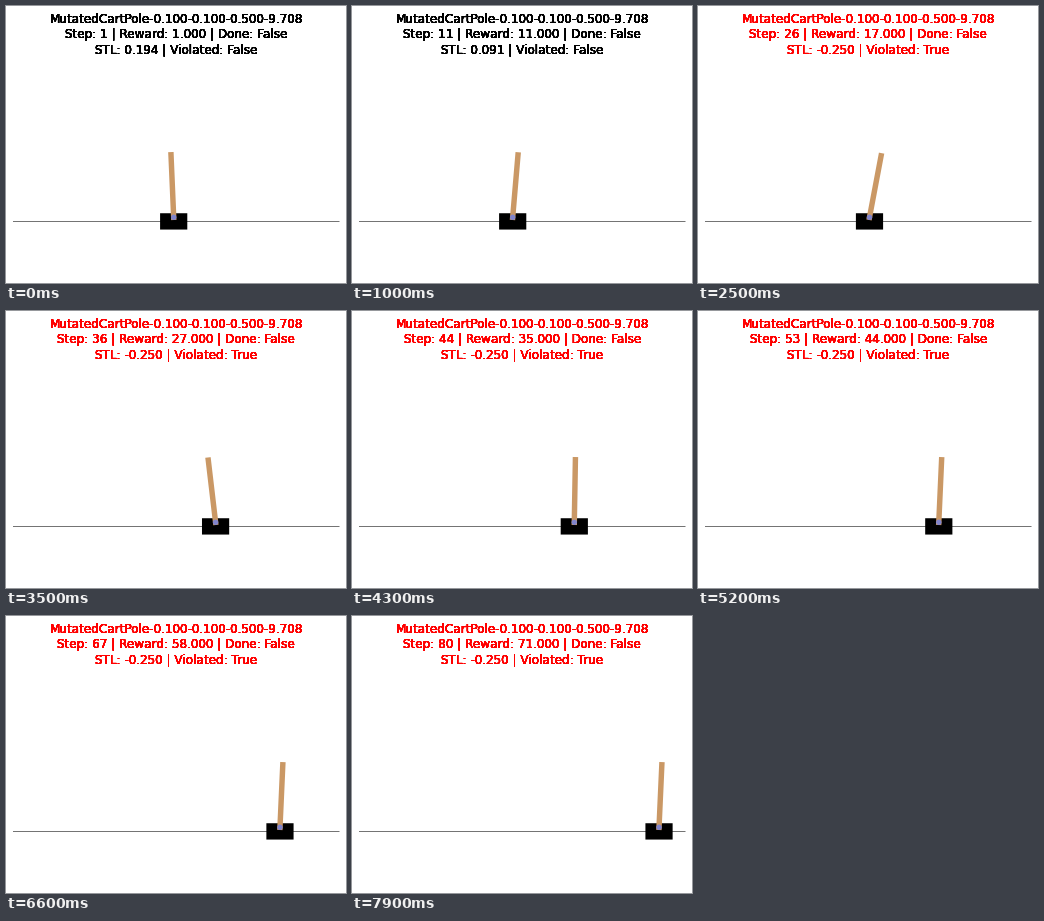
Recreate the animation shown at these times as a matplotlib script. Size 340 by 277 pixels, loop 8 s.

```python
import numpy as np
import matplotlib.pyplot as plt
from matplotlib.animation import FuncAnimation
from matplotlib.patches import Circle, Polygon, Rectangle

W, H, DPI = 340, 277, 72
STEPS = 80
UNIT = 68.0                  # pixels per world unit
PX = UNIT / 125              # pixels per simulator pixel
MID, TRACK, AXLE = 171.5, 215.4, 211.3
CART_W, CART_H = 50 * PX, 30 * PX
POLE_W, POLE_LEN = 10 * PX, UNIT
COUPLING = 1.7               # how far the pole tips back per unit of cart travel
LIMIT = 0.25                 # the cart must stay right of x = -LIMIT


def bump(t, height, mid, width):
    return height * np.exp(-((t - mid) / width) ** 2)


def tilt(t):
    """Starts leaning left, swings far right, dips left, then settles."""
    return (0.045 - bump(t, 0.088, 1, 5) + bump(t, 0.755, 19.6, 5.05)
            - bump(t, 0.162, 36, 6))


def spline(t, keys, vals):
    """Cubic Hermite curve through the keys."""
    m = np.gradient(vals, keys)
    i = np.clip(np.searchsorted(keys, t, side="right") - 1, 0, len(keys) - 2)
    h = keys[i + 1] - keys[i]
    u = (t - keys[i]) / h
    return ((1 + 2 * u) * (1 - u) ** 2 * vals[i] + u * (1 - u) ** 2 * h * m[i]
            + u * u * (3 - 2 * u) * vals[i + 1] + u * u * (u - 1) * h * m[i + 1])


# The swing centre drifts smoothly; the cart swings against the pole around it
steps = np.arange(1, STEPS + 1)
angle = tilt(steps)
keys = np.array([1, 11, 26, 36, 53, 67, 80])
stops = np.array([-.056, -.159, 0, .56, 1.019, 1.507, 1.993])
centre = spline(steps, keys, COUPLING * stops + tilt(keys))
pos = (centre - angle) / COUPLING

margin = np.maximum(pos + LIMIT, -LIMIT)
stl = np.minimum.accumulate(margin)
reward = np.cumsum(margin >= 0)

fig = plt.figure(figsize=(W / DPI, H / DPI), dpi=DPI, facecolor="white")
ax = fig.add_axes([0, 0, 1, 1])
ax.set(xlim=(0, W), ylim=(H, 0))
ax.axis("off")

track = Rectangle((7, 215), 326.5, 1, fc="#747474", lw=0)
cart = Rectangle((0, TRACK - CART_H / 2), CART_W, CART_H, fc="black", lw=0)
pole = Polygon(np.zeros((4, 2)), fc="#ca9865", lw=0)
axle = Circle((0, AXLE), POLE_W / 2, fc="#8184cb", lw=0)
for patch in (track, cart, pole, axle):
    patch.set_snap(False)
    ax.add_patch(patch)

# Stacked copies give the heavy glyph edges
labels = [ax.text(170.2, 50, "", ha="center", va="bottom", fontsize=12,
                  family="DejaVu Sans") for _ in range(12)]


def pole_corners(cx, a):
    half = POLE_W / 2
    along = np.array([-half, POLE_LEN - half, POLE_LEN - half, -half])
    side = np.array([-half, -half, half, half])
    x = cx + along * np.sin(a) + side * np.cos(a)
    y = AXLE - along * np.cos(a) + side * np.sin(a)
    return np.column_stack([x, y])


def draw(i):
    cx = MID + UNIT * pos[i]
    cart.set_x(cx - CART_W / 2)
    pole.set_xy(pole_corners(cx, angle[i]))
    axle.center = (cx, AXLE)
    bad = bool(stl[i] < 0)
    text = ("MutatedCartPole-0.100-0.100-0.500-9.708\n"
            f"Step: {steps[i]} | Reward: {reward[i]:.3f} | Done: False\n"
            f"STL: {stl[i]:.3f} | Violated: {bad}")
    for label in labels:
        label.set_text(text)
        label.set_color("red" if bad else "black")
    return cart, pole, axle, *labels


anim = FuncAnimation(fig, draw, frames=STEPS, interval=100, repeat=True,
                     repeat_delay=0, blit=False)
plt.show()
```
